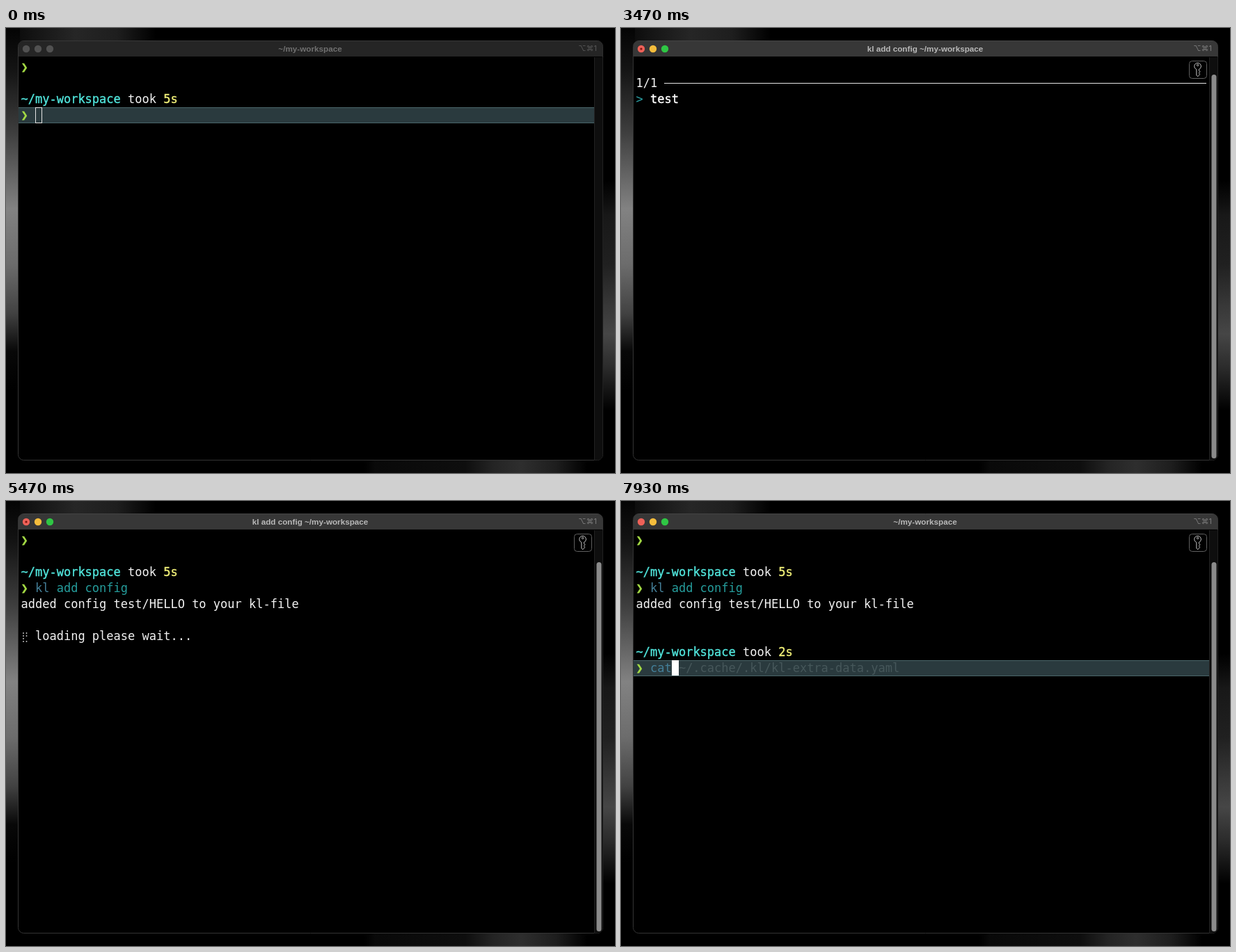
An HTML page with a canvas that plays this animation: 875x640 px, repeating every 8 s.

```html
<!DOCTYPE html>
<html lang="en">
<head>
<meta charset="utf-8">
<title>Terminal</title>
<style>
html, body { margin: 0; width: 875px; height: 640px; overflow: hidden; background: #000; }
canvas { display: block; }
</style>
</head>
<body>
<canvas id="stage" width="875" height="640"></canvas>
<script>
const ctx = document.getElementById('stage').getContext('2d');
const LOOP = 8000, CELL = 10.234, ROW = 23, LEFT = 21.5;
const MONO = '17px "DejaVu Sans Mono", monospace';
const WHITE = '#f2f2f2', CYAN = '#50e3da', YELLOW = '#f1f078', GREEN = '#a5dc45';
const BLUE = '#447f98', TEAL = '#259c9b', GHOST = '#46575a';

// Moments at which the session changes, in ms
const AT = { focus: 70, type: 1330, run: 3000, pick: 3230, key: 4000, save: 4470, saved: 5330, done: 6000, cat: 7670 };
const COMMAND = 'kl add config';
const HINT = 'cat ~/.cache/.kl/kl-extra-data.yaml';

function box(x, y, w, h, r, fill, stroke) {
  ctx.beginPath();
  ctx.roundRect(x, y, w, h, r);
  if (fill) { ctx.fillStyle = fill; ctx.fill(); }
  if (stroke) { ctx.strokeStyle = stroke; ctx.stroke(); }
}

function disc(x, y, r, fill) {
  ctx.fillStyle = fill;
  ctx.beginPath();
  ctx.arc(x, y, r, 0, 7);
  ctx.fill();
}

function write(col, row, text, color, bold) {
  ctx.font = MONO;
  ctx.fillStyle = ctx.strokeStyle = color;
  ctx.textAlign = 'left';
  const x = LEFT + col * CELL, y = 62 + row * ROW;
  ctx.fillText(text, x, y);
  if (bold) {
    ctx.lineWidth = 0.4;
    ctx.strokeText(text, x, y);
    ctx.lineWidth = 1;
  }
}

// Blurred wallpaper edge: stops are [position, grey level] along the longer side
function strip(x, y, w, h, stops) {
  const size = Math.max(w, h);
  const g = ctx.createLinearGradient(0, 0, w > h ? size : 0, w > h ? 0 : size);
  for (const [at, level] of stops) g.addColorStop(at / size, `rgb(${level},${level},${level})`);
  ctx.fillStyle = g;
  ctx.fillRect(x, y, w, h);
}

function desktop() {
  strip(0, 0, 875, 20, [[0, 6], [40, 20], [100, 38], [160, 30], [215, 0]]);
  strip(0, 620, 875, 20, [[515, 0], [530, 9], [660, 14], [700, 36], [740, 46], [790, 30], [835, 0]]);
  strip(0, 0, 20, 640, [[0, 4], [60, 20], [150, 62], [260, 130], [340, 108], [410, 66], [465, 8], [520, 0]]);
  strip(855, 0, 20, 640, [[220, 0], [270, 24], [340, 32], [400, 56], [440, 70], [490, 42], [550, 0]]);
}

function frame(t, running) {
  const focused = t >= AT.focus;
  box(17.5, 18.5, 840, 603, 8, '#000', '#343434');
  ctx.save();
  ctx.clip();
  ctx.fillStyle = focused ? '#373737' : '#252525';
  ctx.fillRect(18, 19, 840, 22);
  ctx.fillStyle = focused ? '#555' : '#3c3c3c';
  ctx.fillRect(18, 18, 840, 1);
  ctx.fillStyle = '#0e0e0e';
  ctx.fillRect(845, 42, 13, 580);
  ctx.fillStyle = '#222';
  ctx.fillRect(845, 42, 1, 580);
  ctx.restore();

  ['#ee6158', '#f5bd3c', '#2fc644'].forEach((color, i) => disc(29 + i * 17, 30, 5.2, focused ? color : '#515151'));
  if (running) disc(29, 30, 1.6, '#7c130d');

  ctx.font = 'bold 11.7px "Liberation Sans", Arial, sans-serif';
  ctx.textAlign = 'center';
  ctx.fillStyle = focused ? '#b8b8b8' : '#707070';
  ctx.fillText((running ? COMMAND + ' ' : '') + '~/my-workspace', 437, 33.5);
  ctx.font = '11px Inter, "DejaVu Sans", sans-serif';
  ctx.textAlign = 'right';
  ctx.fillStyle = focused ? '#7c7c7c' : '#565656';
  ctx.fillText('⌥⌘1', 849, 33);
}

function keyBadge(y) {
  ctx.save();
  ctx.translate(816, y);
  box(0.5, 0.5, 25, 25, 4, '#000', '#606060');
  ctx.strokeStyle = '#c4c4c4';
  ctx.beginPath();
  ctx.arc(12.6, 8, 4.8, 1.95, 1.2);
  ctx.lineTo(14.4, 14);
  ctx.lineTo(16, 15.8);
  ctx.lineTo(14.4, 17.5);
  ctx.lineTo(15.6, 19.5);
  ctx.lineTo(12.8, 22.8);
  ctx.lineTo(10.9, 21);
  ctx.closePath();
  ctx.stroke();
  ctx.beginPath();
  ctx.arc(12.6, 6.3, 1.3, 0, 7);
  ctx.stroke();
  ctx.restore();
}

function chevron(row) {
  write(0, row, '❯', GREEN, true);
}

function promptPath(row, seconds) {
  write(0, row, '~/my-workspace', CYAN, true);
  write(15, row, 'took', WHITE);
  write(20, row, seconds, YELLOW, true);
}

function command(row, text) {
  const [name] = text.split(' ');
  write(2, row, name, BLUE);
  write(2 + name.length, row, text.slice(name.length), TEAL);
}

function inputLine(row, full, count, focused) {
  const y = 45 + row * ROW;
  ctx.fillStyle = '#2a3a3e';
  ctx.fillRect(18, y, 827, 22);
  ctx.fillStyle = '#4a666a';
  ctx.fillRect(18, y, 827, 1);
  ctx.fillRect(18, y + 22, 827, 1);
  chevron(row);
  if (count) {
    write(2 + count, row, full.slice(count), GHOST);
    command(row, full.slice(0, count));
  }
  const x = Math.round(LEFT + (2 + count) * CELL);
  if (focused) {
    ctx.fillStyle = '#fff';
    ctx.fillRect(x, y, 10, 22);
  } else {
    ctx.strokeStyle = '#e4e4e4';
    ctx.strokeRect(x + 0.5, y + 0.5, 9, 22);
  }
}

function loading(row, t) {
  const gap = Math.floor(t / 100) % 8;
  for (let i = 0; i < 8; i++) {
    if (i !== gap) disc(25 + (i >> 2) * 4.5, 52 + row * ROW + (i % 4) * 4, 0.95, '#c8c8c8');
  }
  write(2, row, 'loading please wait...', WHITE);
}

function picker(item) {
  write(0, 1, '1/1', WHITE);
  ctx.fillStyle = '#e6e6e6';
  ctx.fillRect(62, 79, 779, 1);
  write(0, 2, '>', '#2a9fa3');
  write(2, 2, item, '#fff', true);
}

function shell(t) {
  chevron(0);
  promptPath(2, '5s');
  if (t < AT.run) {
    const typed = t < AT.type ? 0 : Math.min(COMMAND.length, 1 + Math.floor((t - AT.type) / 110));
    inputLine(3, COMMAND, typed, t >= AT.focus);
    return;
  }
  chevron(3);
  command(3, COMMAND);
  if (t < AT.pick) {
    loading(4, t);
    return;
  }
  write(0, 4, 'added config test/HELLO to your kl-file', WHITE);
  if (t < AT.done) {
    loading(6, t);
    return;
  }
  promptPath(7, '2s');
  inputLine(8, HINT, t < AT.cat ? 0 : Math.min(3, 1 + Math.floor((t - AT.cat) / 130)), true);
}

function draw(t) {
  ctx.fillStyle = '#000';
  ctx.fillRect(0, 0, 875, 640);
  desktop();
  frame(t, t >= AT.run && t < AT.done);
  if (t >= AT.pick && t < AT.saved) {
    picker(t < AT.key ? 'test' : 'HELLO');
    if (t >= AT.save) loading(24, t);
  } else {
    shell(t);
  }
  if (t >= AT.focus) keyBadge(t < AT.pick ? 45 : 47);
  if (t >= AT.pick) {
    const top = t < AT.key ? 67 : 88;
    box(848.5, top, 7, 619 - top, 3.5, '#8b8b8b');
  }
}

const start = performance.now();
function tick() {
  draw((performance.now() - start) % LOOP);
  requestAnimationFrame(tick);
}
tick();
</script>
</body>
</html>
```
